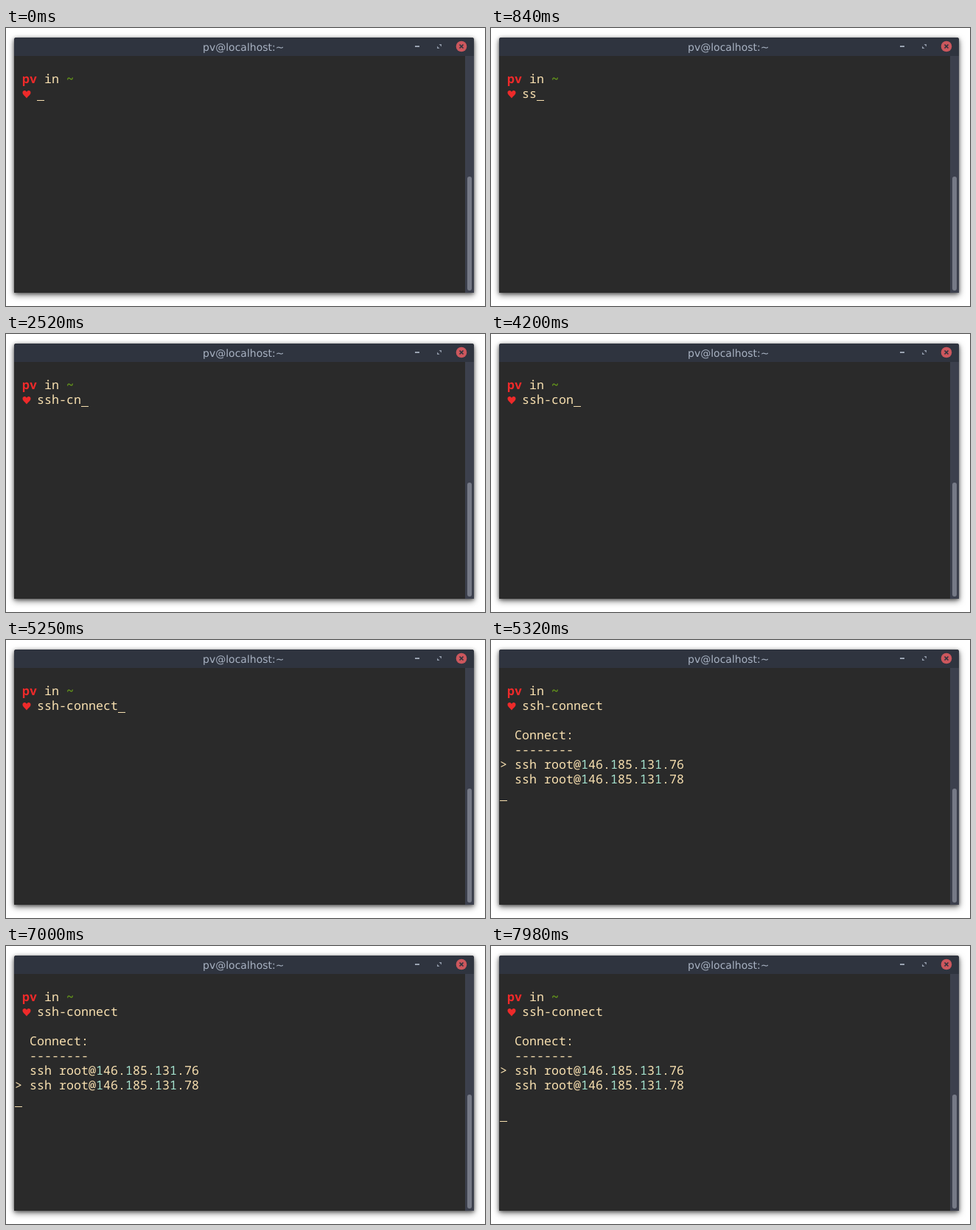
An HTML page that plays this animation: 650 px wide and 378 px high, repeating every 8 s.

```html
<!DOCTYPE html>
<html lang="en">
<head>
<meta charset="utf-8">
<title>Terminal</title>
<style>
  html, body { margin: 0; width: 100%; height: 100%; overflow: hidden; background: #fff; }
  .window {
    position: absolute; left: 11px; top: 13px; width: 624px; height: 347px;
    border-radius: 3px 3px 0 0; background: #2a2a2a;
    box-shadow: 0 3px 9px rgba(0, 0, 0, .55), 0 1px 4px rgba(0, 0, 0, .4);
  }
  svg { position: absolute; left: 0; top: 0; display: block; }
  text { white-space: pre; text-rendering: geometricPrecision; }
  .term { font: 16.6667px "Noto Sans Mono", monospace; fill: #f8e0b0; }
  .title { font: 14px "DejaVu Sans", sans-serif; fill: #a8b2c2; }
  .user { font-weight: 700; fill: #ee2a2a; }
  .path { font-weight: 700; fill: #689d1a; }
  .one { fill: #a5e3cf; }
</style>
</head>
<body>
<div class="window"></div>
<svg width="650" height="378" viewBox="0 0 650 378">
  <path d="M11 38V16q0-3 3-3H632q3 0 3 3V38Z" fill="#2f343f"/>
  <rect x="623" y="38" width="12" height="322" fill="#3c404d"/>
  <rect x="626" y="202" width="6" height="155" rx="3" fill="#767a87"/>
  <text class="title" x="267" y="31">pv@localhost:~</text>

  <rect x="555" y="24" width="6" height="2" fill="#9aa3b1"/>
  <path d="M587.5 22H591V25.5ZM585 24.5V28H588.500Z" fill="#8d96a5"/>
  <circle cx="618" cy="25" r="7.3" fill="#cc575d"/>
  <path d="M615.500 22.500l5 5m0-5l-5 5" stroke="#2f343f" stroke-width="1.700"/>

  <g class="term">
    <text class="user" x="22" y="75">pv</text>
    <text x="52" y="75">in</text>
    <text class="path" x="82" y="75">~</text>
    <path fill="#ee2a2a" d="M28 95.500C26 92.500 22.500 91 22.500 87.800C22.500 84.500 26.500 84 28 87C29.500 84 33.500 84.500 33.500 87.800C33.500 91 30 92.500 28 95.500Z"/>
    <text id="command" x="42" y="95"></text>
    <g id="menu">
      <text x="32" y="135">Connect:</text>
      <text x="32" y="155">--------</text>
      <text class="host" x="32" y="175">ssh root@146.185.131.76</text>
      <text class="host" x="32" y="195">ssh root@146.185.131.78</text>
      <text id="arrow" x="12">&gt;</text>
    </g>
    <rect id="cursor" width="10" height="1"/>
  </g>
</svg>
<script>
  const LOOP = 8000;
  const [command, menu, arrow, cursor] =
    ['command', 'menu', 'arrow', 'cursor'].map(id => document.getElementById(id));

  // Typing: time, text, cursor visible
  const typing = [
    [0, '', true], [70, '', false], [630, '', true],
    [700, 's', true], [840, 'ss', true],
    [1260, 'ssh', true], [1820, 'ssh', false], [1960, 'ssh', true],
    [2030, 'ssh-', true], [2240, 'ssh-c', true], [2520, 'ssh-cn', true],
    [3010, 'ssh-c', true], [3220, 'ssh-co', true], [4200, 'ssh-con', true],
    [4410, 'ssh-connect', true], [4970, 'ssh-connect', false], [5250, 'ssh-connect', true]
  ];

  // Menu: time, selected row, cursor visible, cursor y
  const choosing = [
    [5320, 0, true, 218], [5880, 0, false, 218], [6090, 1, true, 218],
    [6580, 0, true, 218], [7000, 1, true, 218], [7420, 0, true, 218],
    [7980, 0, true, 238]
  ];

  for (const host of document.querySelectorAll('.host')) {
    host.innerHTML = host.textContent.replace(/1/g, '<tspan class="one">1</tspan>');
  }

  const stepAt = (steps, time) => steps.findLast(step => step[0] <= time);

  function placeCursor(x, y, visible) {
    cursor.setAttribute('x', x);
    cursor.setAttribute('y', y);
    cursor.style.visibility = visible ? 'visible' : 'hidden';
  }

  function draw(time) {
    const [, typed, typingCursor] = stepAt(typing, time);
    const choice = stepAt(choosing, time);
    command.textContent = typed;
    menu.style.visibility = choice ? 'visible' : 'hidden';
    if (choice) {
      const [, row, visible, y] = choice;
      arrow.setAttribute('y', 175 + 20 * row);
      placeCursor(12, y, visible);
    } else {
      placeCursor(42 + 10 * typed.length, 98, typingCursor);
    }
  }

  const start = performance.now();
  function tick() {
    draw((performance.now() - start) % LOOP);
    requestAnimationFrame(tick);
  }
  tick();
</script>
</body>
</html>
```
